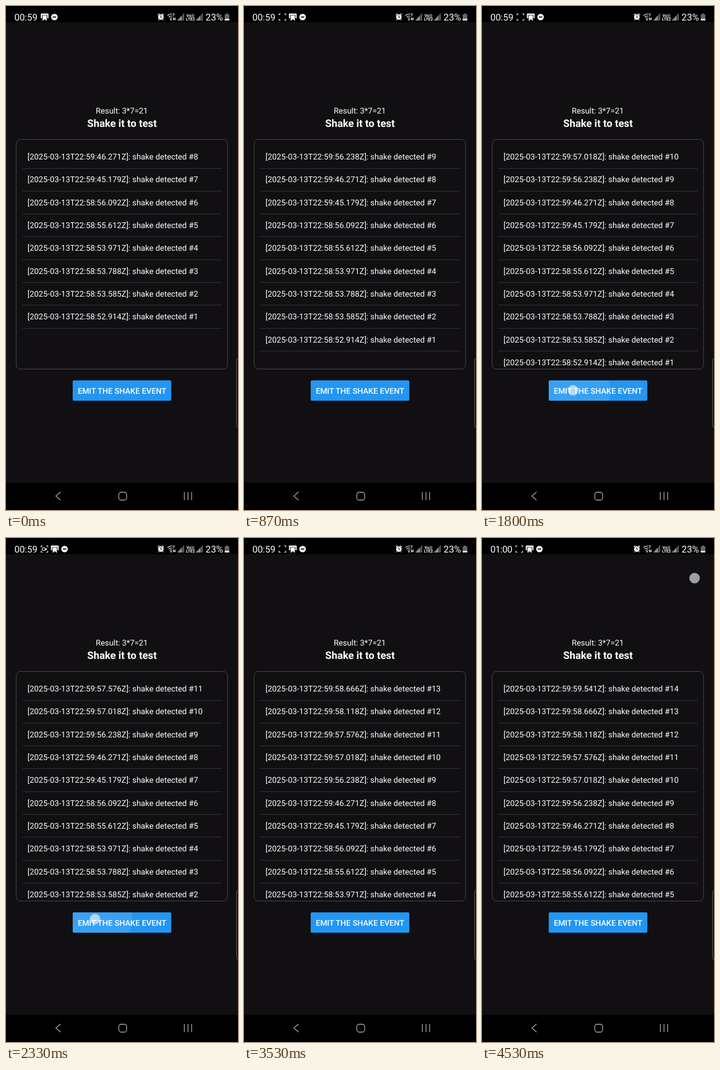
These frames come from a looping animation (400x867 px, 4670 ms). An HTML page:

```html
<!DOCTYPE html>
<html lang="en">
<head>
<meta charset="utf-8">
<title>Shake test</title>
<style>
  html, body { margin: 0; width: 100%; height: 100%; overflow: hidden; background: #000; }
  svg { display: block; width: 100%; height: 100%; font-family: Roboto, sans-serif; fill: #fff; }
  text { text-rendering: geometricPrecision; }
  .row { font-size: 13.83px; }
  .line { stroke: #343337; }
  .nav { fill: none; stroke: #aaa; stroke-width: 1.3; }
  .thin { fill: none; stroke: #fff; stroke-width: 1.1; }
</style>
</head>
<body>
<svg id="stage" viewBox="0 0 400 867">
  <defs>
    <clipPath id="listClip"><rect x="18" y="230" width="364" height="394" rx="7"/></clipPath>
    <clipPath id="buttonClip"><rect x="115" y="644" width="170" height="35" rx="2"/></clipPath>
    <g id="signal">
      <path d="M0 25v-2h1.3v2zM2.3 25v-4.5h1.3v4.5zM4.6 25v-7h1.3v7z"/>
      <path d="M6.9 25v-9.5h1.3v9.5zM9.2 25v-12h1.3v12z" opacity=".55"/>
    </g>
  </defs>

  <rect width="400" height="867" fill="#000"/>
  <rect y="28" width="400" height="792.5" fill="#110f12"/>

  <!-- status bar, left -->
  <text id="clock" x="14.5" y="24.5" font-size="15.9"></text>
  <g id="record">
    <path class="thin" d="M60.5 16v-2.500h2.500M69.500 13.500h2.500v2.500M72 22v2.500h-2.500M63 24.500h-2.500v-2.500"/>
    <g id="camera">
      <rect class="thin" x="62.500" y="16.700" width="4.800" height="4.800" rx="1"/>
      <path d="M68 18.500l2-1.500v4.400l-2-1.500z"/>
    </g>
  </g>
  <g id="notices">
    <path d="M60 13h13.200v8h-2v-5.500h-9.200v5.500h-2z"/>
    <path d="M63 16.200h7.200v8.800h-1.800v-1.800h-3.600v1.800h-1.800z"/>
    <circle cx="83.500" cy="19" r="5.600"/>
    <path d="M80.500 19h6" stroke="#000" stroke-width="1.700"/>
  </g>

  <!-- status bar, right -->
  <circle cx="267" cy="19" r="4.800"/>
  <path class="thin" d="M261.800 15.500l2.700-2.500M272.200 15.500l-2.700-2.500M263.700 23l-1.200 1.500M270.300 23l1.200 1.500" stroke-width="1.500"/>
  <path d="M267 16v3.200l2 1.200" fill="none" stroke="#000" stroke-width="1.100"/>
  <path class="thin" d="M278.500 16.500q4-3.500 8-2.500M280.500 19q3-2.500 6-1.500M282.300 21.300q1.800-1.500 3.700-.8"/>
  <circle cx="284.500" cy="23.500" r="1.200"/>
  <text x="287" y="18" font-size="7" font-weight="700">7</text>
  <path d="M287 21.500l1.500-2 1.500 2v3h-1.500v-3zM290 22.500h1v-3h1v3h1l-1.500 2z"/>
  <use href="#signal" x="296.500"/>
  <g font-size="7" font-weight="700" text-anchor="middle">
    <text x="318" y="18.500">Vo))</text>
    <text x="318" y="25.300">LTE2</text>
  </g>
  <use href="#signal" x="328.500"/>
  <text x="344" y="24.500" font-size="16.300">23%</text>
  <path d="M379 13h4v1.500h2v10.500h-8v-10.500h2z" fill="#666"/>
  <path d="M377 22h8v3h-8z" fill="#ddd"/>

  <!-- page -->
  <g text-anchor="middle">
    <text x="199.700" y="185" font-size="13.830">Result: 3*7=21</text>
    <text x="200" y="208" font-size="17.800" font-weight="700">Shake it to test</text>
  </g>
  <g id="list" clip-path="url(#listClip)"></g>
  <rect x="17.500" y="229.500" width="364.500" height="395" rx="7.500" fill="none" stroke="#48474b"/>

  <g clip-path="url(#buttonClip)">
    <rect x="115" y="644" width="170" height="35" fill="#2196f3"/>
    <text x="200" y="666.700" font-size="13.700" font-weight="500" text-anchor="middle">EMIT THE SHAKE EVENT</text>
    <circle id="ripple"/>
  </g>
  <circle id="touch" r="8.700" fill-opacity=".6" stroke="#b9dcf5" stroke-opacity=".45"/>

  <path d="M401 606h-.5q-3 0-3 4v111q0 4 3 4h.5" fill="#111" stroke="#5e5e61"/>

  <!-- navigation bar -->
  <path class="nav" d="M94 836l-8 7 8 7"/>
  <rect class="nav" x="194.500" y="836.500" width="13.500" height="13.500" rx="4"/>
  <path class="nav" d="M307.500 836v14M313.800 836v14M320 836v14"/>
</svg>

<script>
const LOOP = 4670, PITCH = 39.33, VISIBLE = 10;
const FADE = 190;

const stamps = [
  '22:58:52.914', '22:58:53.585', '22:58:53.788', '22:58:53.971', '22:58:55.612',
  '22:58:56.092', '22:59:45.179', '22:59:46.271', '22:59:56.238', '22:59:57.018',
  '22:59:57.576', '22:59:58.118', '22:59:58.666', '22:59:59.541'
];
const STARTED = 8;

// each press adds one row when it is released
const presses = [
  { down: 530, up: 670, x: 156, y: 658 },
  { down: 1240, up: 1450, x: 156, y: 659 },
  { down: 1800, up: 2000, x: 157, y: 661 },
  { down: 2330, up: 2535, x: 153.5, y: 655.5 },
  { down: 2870, up: 3085, x: 155, y: 658 },
  { down: 3800, up: 3970, x: 156, y: 659 }
];
const lastTouch = { down: 4400, up: LOOP, x: 366.5, y: 69 };

const $ = id => document.getElementById(id);
const clamp = v => Math.min(1, Math.max(0, v));
const show = (el, on) => el.setAttribute('visibility', on ? 'visible' : 'hidden');

function add(parent, tag, attrs) {
  const el = document.createElementNS('http://www.w3.org/2000/svg', tag);
  for (const key in attrs) el.setAttribute(key, attrs[key]);
  return parent.appendChild(el);
}

const rows = Array.from({ length: VISIBLE }, (_, i) => {
  const lineY = Math.round(278.5 + i * PITCH) + 0.5;
  return {
    text: add($('list'), 'text', { class: 'row', x: 37.1, y: 264 + i * PITCH }),
    line: add($('list'), 'path', { class: 'line', d: `M28 ${lineY}H372` })
  };
});

function drawList(count) {
  rows.forEach(({ text, line }, i) => {
    const n = count - i;
    const label = n > 0 ? `[2025-03-13T${stamps[n - 1]}Z]: shake detected #${n}` : '';
    if (text.textContent !== label) text.textContent = label;
    show(line, n > 0);
  });
}

function drawTouch(t) {
  const dot = [...presses, lastTouch].find(p => t >= p.down && t < p.up);
  show($('touch'), dot);
  if (dot) {
    $('touch').setAttribute('cx', dot.x);
    $('touch').setAttribute('cy', dot.y);
  }
  const press = presses.find(p => t >= p.down && t < p.up + FADE);
  show($('ripple'), press);
  if (press) {
    $('ripple').setAttribute('cx', press.x);
    $('ripple').setAttribute('cy', press.y);
    $('ripple').setAttribute('r', 64 + 75 * clamp((t - press.down) / 220));
    $('ripple').setAttribute('opacity', 0.1 * (1 - clamp((t - press.up) / FADE)));
  }
}

function drawStatus(t) {
  const nextMinute = t >= 4470;
  const nudge = nextMinute ? -2 : 0;
  const enter = clamp((t - 50) / 200);
  $('clock').textContent = nextMinute ? '01:00' : '00:59';
  $('clock').setAttribute('letter-spacing', nextMinute ? -0.4 : 0);
  $('record').setAttribute('transform', `translate(${nudge})`);
  $('record').setAttribute('opacity', t < 70 ? 0 : enter);
  $('notices').setAttribute('transform', `translate(${t < 70 ? 0 : 17.5 * enter + nudge})`);
  show($('camera'), t < 530 || (t + 970) % 1000 < 500 && t > 1000);
}

function draw(t) {
  drawStatus(t);
  drawList(STARTED + presses.filter(p => t >= p.up).length);
  drawTouch(t);
}

const start = performance.now();
function tick() {
  draw((performance.now() - start) % LOOP);
  requestAnimationFrame(tick);
}
draw(0);
requestAnimationFrame(tick);
</script>
</body>
</html>
```
